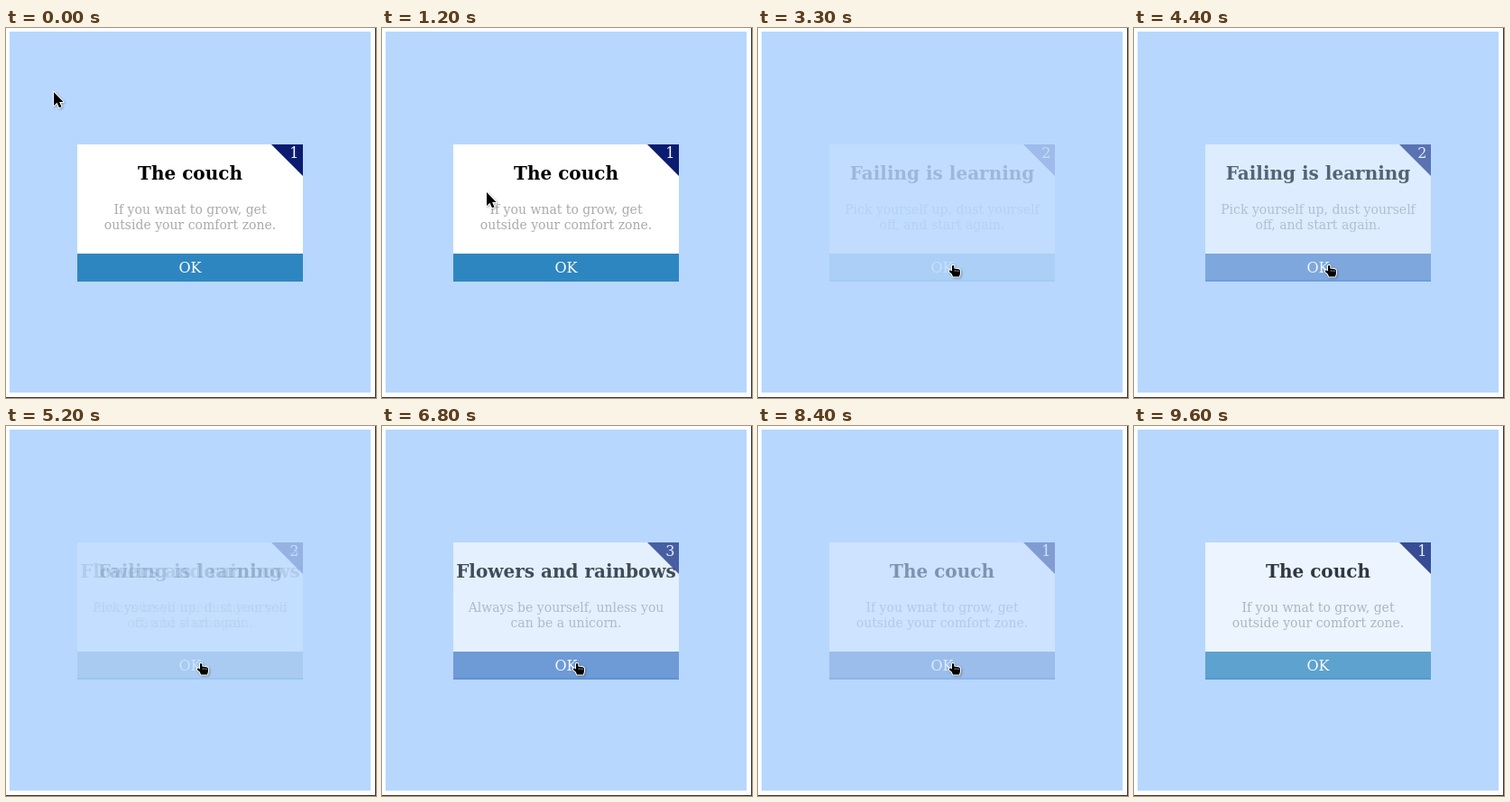
Write an HTML page that moves like this. It is 410 px wide and 410 px high and loops after 9700 ms.

```html
<!DOCTYPE html>
<html lang="en">
<head>
<meta charset="utf-8">
<title>Card deck</title>
<style>
  html, body { margin: 0; width: 100%; height: 100%; overflow: hidden; background: #fff; }
  body { position: relative; font-family: "DejaVu Serif", serif; }
  #stage {
    position: absolute; left: 0; top: 0; width: 410px; height: 410px; box-sizing: border-box;
    border-right: 1px solid #333; border-bottom: 1px solid #333; overflow: hidden;
  }
  #page { position: absolute; left: 4px; top: 4px; width: 400px; height: 400px; background: #b7d7ff; }
  .panel, .ok { position: absolute; left: 79px; width: 250px; text-align: center; white-space: nowrap; }
  .panel { top: 129px; height: 150px; background: #fff; }
  .panel h1 { position: absolute; left: 0; right: 0; top: 20px; margin: 0; font-size: 20px; line-height: 24px; color: #000; }
  .panel p { position: absolute; left: 0; right: 0; top: 64px; margin: 0; font-size: 14px; line-height: 17px; color: #aaa; }
  .corner {
    position: absolute; right: 0; top: 0; width: 35px; height: 35px;
    background: #0b1c70; clip-path: polygon(0 0, 100% 0, 100% 100%);
  }
  .corner span { position: absolute; right: 4.5px; top: 0; font-size: 16px; line-height: 19px; color: #fff; }
  .ok { top: 250px; height: 31px; font-size: 16px; line-height: 19px; padding-top: 6px; box-sizing: border-box; color: #fff; }
  #cursor { position: absolute; left: 0; top: 0; overflow: visible; filter: drop-shadow(1px 1px 1px rgba(0, 0, 0, .3)); }
  #cursor path { stroke-linejoin: round; }
  .edge { fill: #000; stroke: #fff; stroke-width: 2; paint-order: stroke; }
  .crease { fill: none; stroke: #fff; stroke-width: .6; }
</style>
</head>
<body>
<div id="stage">
  <div id="page"></div>
  <div id="deck"></div>
  <svg id="cursor" width="1" height="1">
    <g id="arrow"><path class="edge" d="M0 0V15L3.5 11.8 6 17.3 8.5 16.2 6.1 10.9H10.6Z"/></g>
    <g id="hand">
      <path class="edge" d="M-1 .5Q0-.6 1.3 .5V3.4L6.5 4.2Q8 4.6 8 6V9L7 12.4H0L-1.2 9.6-4 7.2Q-4.6 5.6-3 5.3L-1 6.4Z"/>
      <path class="crease" d="M2.4 5.2V7M4.5 5.4V7M6.4 5.6V7.2"/>
    </g>
  </svg>
</div>
<script>
const LOOP = 9700, FADE_IN = 2800, FADE_OUT = 930, HOVER = 300;
const $ = id => document.getElementById(id);
const clamp = u => Math.min(1, Math.max(0, u));
const mix = (a, b, u) => a + (b - a) * u;

// The picture only updates at these moments.
const ticks = [0];
for (let t = 600; t <= 2000; t += 100) ticks.push(t);
ticks.push(3300, 3500, 3700, 3800, 4000, 4100, 4400, 4600, 4800, 5000, 5200, 5400,
  5700, 5900, 6100, 6400, 6600, 6800, 7000, 7300, 7500, 7600, 7800, 8000, 8400, 8900, 9600);

const couch = { no: 1, title: "The couch", text: "If you wnat to grow, get<br>outside your comfort zone." };
const cards = [
  { ...couch, start: -FADE_IN, out: 2370, hover: 1650 },
  { no: 2, title: "Failing is learning", text: "Pick yourself up, dust yourself<br>off, and start again.",
    start: 2900, out: 4470, hover: 3400 },
  { no: 3, title: "Flowers and rainbows", text: "Always be yourself, unless you<br>can be a unicorn.",
    start: 5000, out: 7000, hover: 5500 },
  { ...couch, start: 7530, out: LOOP, hover: 7800, leave: 8600 }
];

for (const c of cards) {
  $("deck").insertAdjacentHTML("beforeend",
    `<div class="panel"><div class="corner"><span>${c.no}</span></div><h1>${c.title}</h1><p>${c.text}</p></div>
     <div class="ok">OK</div>`);
  c.ok = $("deck").lastElementChild;
  c.panel = c.ok.previousElementSibling;
}

const idle = [46, 134, 193], hot = [45, 108, 192];

function drawCard(c, t) {
  const shown = clamp((Math.min(t, c.out) - c.start) / FADE_IN);
  const alpha = shown * (1 - clamp((t - c.out) / FADE_OUT));
  const heat = clamp((t - c.hover) / HOVER) - clamp((t - (c.leave || LOOP)) / HOVER);
  c.panel.style.opacity = c.ok.style.opacity = alpha;
  c.panel.style.visibility = c.ok.style.visibility = alpha ? "visible" : "hidden";
  c.ok.style.background = `rgb(${idle.map((v, i) => mix(v, hot[i], heat))})`;
}

// time, x, y of the pointer tip
const path = [[500, 53, 71], [1600, 143, 229], [1700, 167, 253], [1800, 192, 262],
  [1900, 209, 264], [2000, 216, 263], [8500, 216, 263], [8900, 222, 98]];

function pointer(t) {
  const i = path.findIndex(p => p[0] > t);
  if (i === 0) return path[0].slice(1);
  if (i < 0) return path[path.length - 1].slice(1);
  const [a, b] = [path[i - 1], path[i]];
  let u = (t - a[0]) / (b[0] - a[0]);
  if (i === 1) u = u * u * (3 - 2 * u);
  return [mix(a[1], b[1], u), mix(a[2], b[2], u)].map(Math.round);
}

function draw(now) {
  const time = now % LOOP;
  const t = ticks.filter(k => k <= time).pop();
  cards.forEach(c => drawCard(c, t));
  const [x, y] = pointer(t);
  const over = x >= 79 && x < 329 && y >= 250 && y < 281;
  $("cursor").style.transform = `translate(${x}px, ${y}px)`;
  $("cursor").style.display = t < 9600 ? "block" : "none";
  $("hand").style.display = over ? "inline" : "none";
  $("arrow").style.display = over ? "none" : "inline";
}

const begin = performance.now();
function loop() {
  draw(performance.now() - begin);
  requestAnimationFrame(loop);
}
loop();
</script>
</body>
</html>
```
